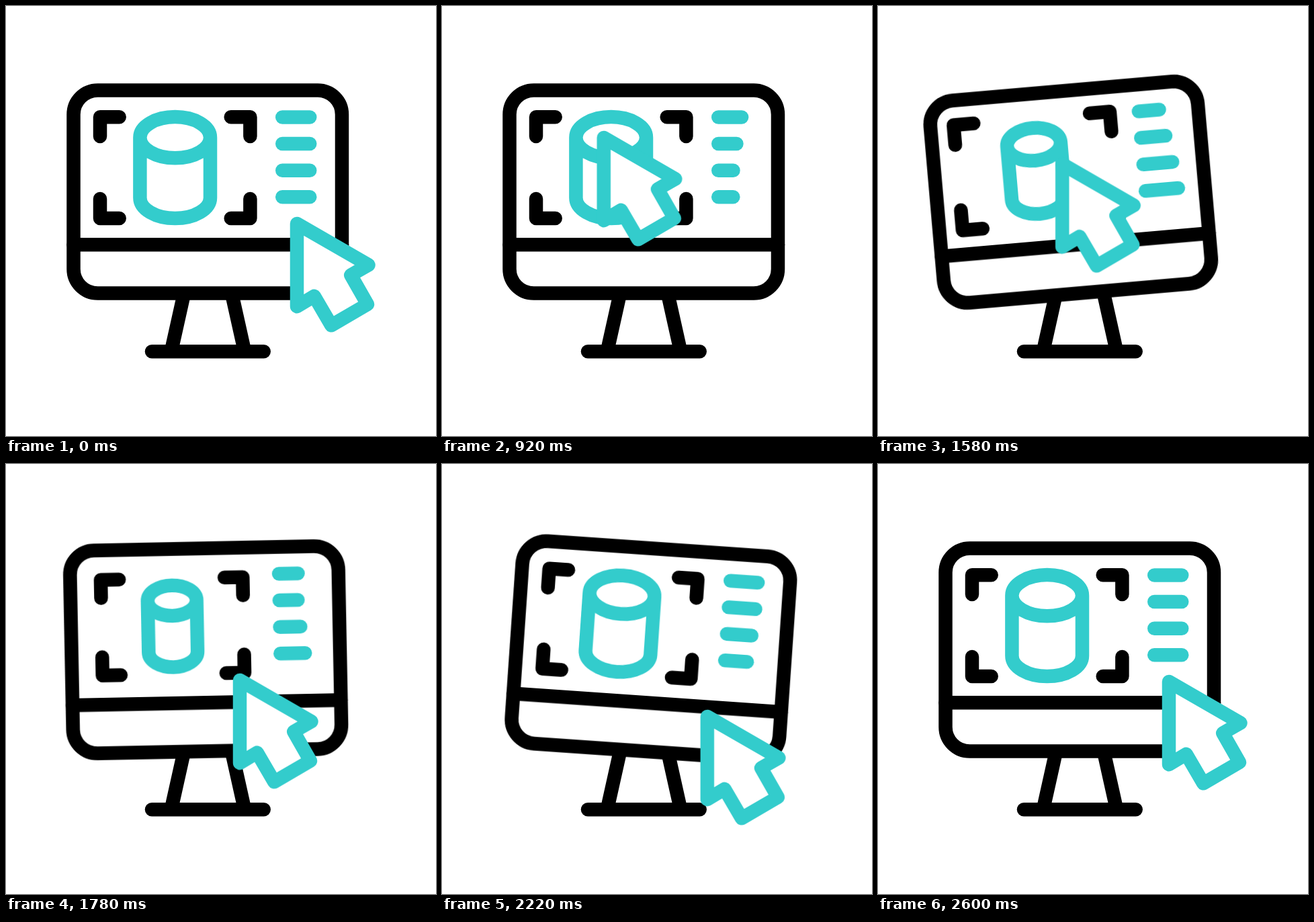
Animation of 640x640 px, one loop 3000 ms. Source, as an HTML page without scripts:

```html
<!DOCTYPE html>
<html lang="en">
<head>
<meta charset="utf-8">
<title>3D modelling monitor</title>
<style>
  html, body { margin: 0; width: 100%; height: 100%; overflow: hidden; background: #fff; }
  svg { display: block; width: 100%; height: 100%; }

  .line { fill: none; stroke: #000; stroke-width: 20.5; stroke-linecap: round; stroke-linejoin: round; }
  .accent { stroke: #33cccc; }

  .screen, .brackets, .cylinder, .bars rect, .cursor {
    animation: 3s cubic-bezier(.3333, 0, .6667, 1) infinite;
  }
  .screen { transform-origin: 300px 431px; animation-name: tilt; }
  .brackets { transform-origin: 251.7px 240.6px; animation-name: pulse; }
  .brackets path { vector-effect: non-scaling-stroke; }
  .cylinder { animation-name: squeeze; }
  .cursor { fill: #fff; animation-name: travel; }

  .bars rect { x: 401px; width: 61.5px; height: 20.5px; rx: 10.25px; fill: #33cccc; animation-name: stretch; }
  .bars rect:nth-child(2) { animation-delay: .1s; }
  .bars rect:nth-child(3) { animation-delay: .2s; }
  .bars rect:nth-child(4) { animation-delay: .3s; }

  @keyframes travel {
    0%, 6.667%, 86.667%, 100% { transform: translate(0, 0); }
    26.667%, 46.667% { transform: translate(-192.3px, -128px); }
    66.667%, 73.333% { transform: translate(-38.5px, 52.3px); }
  }
  @keyframes tilt {
    0%, 35.333%, 85.333%, 100% { transform: rotate(0deg); }
    52% { transform: rotate(-5deg); }
    69.333% { transform: rotate(5deg); }
  }
  @keyframes pulse {
    0%, 36.667%, 76.667%, 100% { transform: scale(1); }
    50% { transform: scale(1.06); }
    63.333% { transform: scale(.915); }
  }
  @keyframes squeeze {
    0%, 37.667%, 81%, 100% {
      d: path("M199.4 195.7 A52.3 30.6 0 0 1 304 195.7 A52.3 30.6 0 0 1 199.4 195.7 L199.4 285.4 A52.3 30.6 0 0 0 304 285.4 L304 195.7");
    }
    59.333% {
      d: path("M215.3 202.3 A36.4 22.6 0 0 1 288.1 202.3 A36.4 22.6 0 0 1 215.3 202.3 L215.3 278.8 A36.4 22.6 0 0 0 288.1 278.8 L288.1 202.3");
    }
  }
  @keyframes stretch {
    0%, 6.667%, 73.333%, 100% { width: 61.5px; }
    22.333% { width: 42px; }
    40% { width: 71px; }
    56.667% { width: 48px; }
  }
</style>
</head>
<body>
<svg viewBox="0 0 640 640">
  <g class="line">
    <path d="M264 432.5 L247.4 507 M337 432.5 L353.6 507" stroke-linecap="butt"/>
    <path d="M217 514.3 H383.7"/>
  </g>

  <g class="screen">
    <g class="line">
      <rect x="100.5" y="125.5" width="399.5" height="302" rx="36"/>
      <path d="M100.5 355.2 H500"/>
    </g>
    <g class="line brackets">
      <path d="M140 194 V165.3 H168.7"/>
      <path d="M334.7 165.3 H363.4 V194"/>
      <path d="M140 287 V315.9 H168.7"/>
      <path d="M334.7 315.9 H363.4 V287"/>
    </g>
    <path class="line accent cylinder" d="M199.4 195.7 A52.3 30.6 0 0 1 304 195.7 A52.3 30.6 0 0 1 199.4 195.7 L199.4 285.4 A52.3 30.6 0 0 0 304 285.4 L304 195.7"/>
    <g class="bars">
      <rect y="155.2"/>
      <rect y="194.8"/>
      <rect y="234.4"/>
      <rect y="273.9"/>
    </g>
  </g>

  <path class="line accent cursor" d="M433 324 L539.5 385.3 L513.2 400.5 L538 444 L484.2 475.3 L458.8 431.8 L433 447.2 Z"/>
</svg>
</body>
</html>
```
